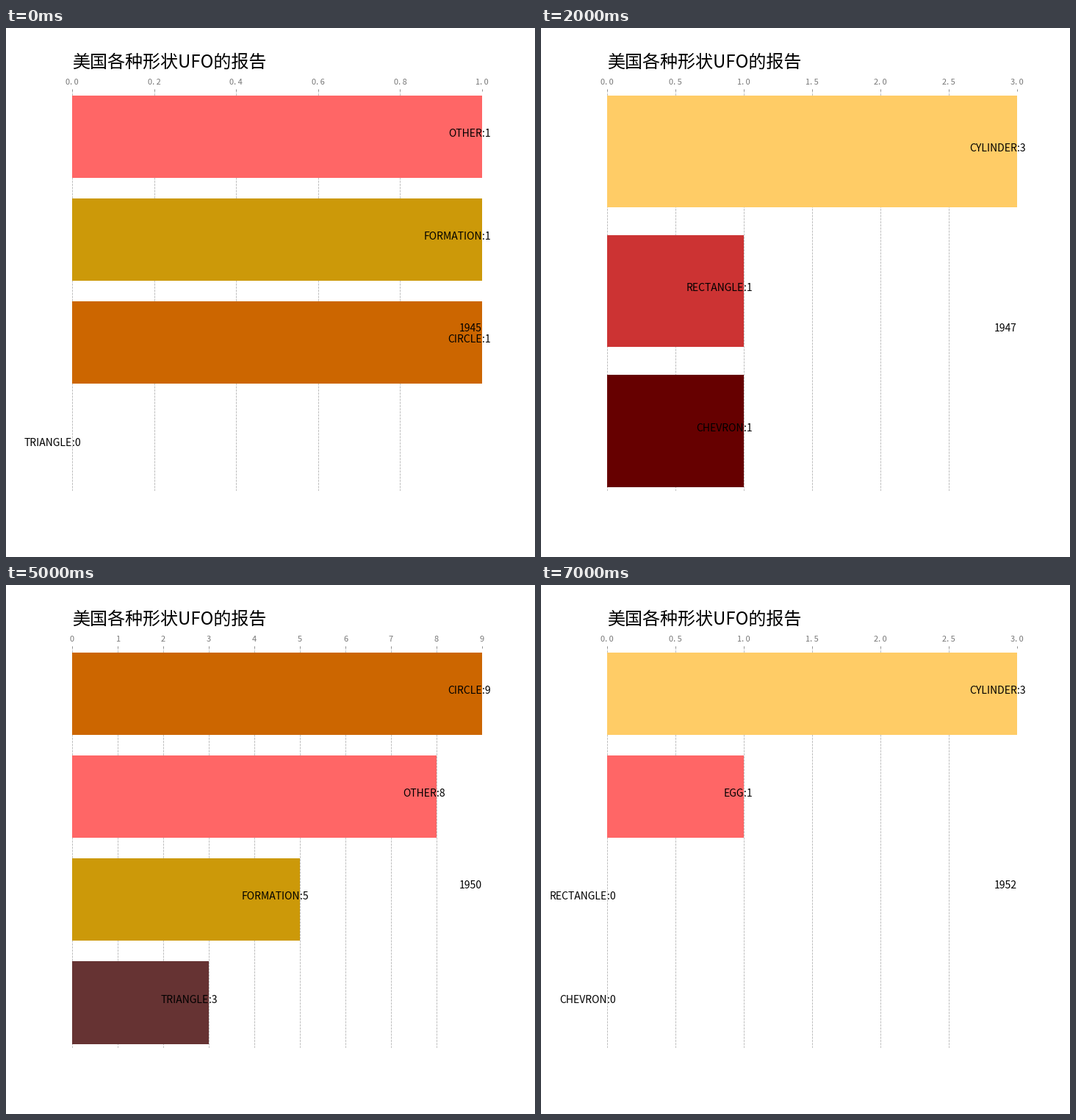
Animation, 720 px wide and 720 px high, one loop 8000 ms. Source, as a matplotlib script:

```python
import matplotlib.pyplot as plt
from matplotlib.animation import FuncAnimation

plt.rcParams["font.family"] = "Noto Sans CJK JP"

TITLE = "美国各种形状UFO的报告"
FIRST_YEAR = 1945
GRAY = "#777777"

COLORS = {
    "OTHER": "#ff6666",
    "FORMATION": "#cc9909",
    "CIRCLE": "#cc6600",
    "TRIANGLE": "#663333",
    "DISK": "#ff9900",
    "CIGAR": "#996633",
    "CYLINDER": "#ffcc66",
    "RECTANGLE": "#cc3333",
    "CHEVRON": "#660000",
    "EGG": "#ff6666",
    "LIGHT": "#ffffcc",
    "SPHERE": "#ffcc33",
    "FIREBALL": "#ffcccc",
}

# One entry per year, bars listed from the bottom up.
REPORTS = [
    {"TRIANGLE": 0, "CIRCLE": 1, "FORMATION": 1, "OTHER": 1},
    {"CIGAR": 1, "DISK": 11},
    {"CHEVRON": 1, "RECTANGLE": 1, "CYLINDER": 3},
    {"LIGHT": 3},
    {"FIREBALL": 2, "SPHERE": 5},
    {"TRIANGLE": 3, "FORMATION": 5, "OTHER": 8, "CIRCLE": 9},
    {"CIGAR": 0, "DISK": 12},
    {"CHEVRON": 0, "RECTANGLE": 0, "EGG": 1, "CYLINDER": 3},
]

fig = plt.figure(figsize=(10, 10), dpi=72, facecolor="white")
ax = fig.add_axes([0.125, 0.125, 0.775, 0.755])


def style_axes(top, count):
    ax.set_frame_on(False)
    ax.set_axisbelow(True)
    ax.set_xlim(0, top)
    margin = 0.01 * (count - 0.2)
    ax.set_ylim(-0.4 - margin, count - 0.6 + margin)
    ax.set_yticks([])
    ax.xaxis.set_ticks_position("top")
    ax.tick_params(axis="x", color=GRAY, labeltop=False, labelbottom=False)
    ax.grid(axis="x", linestyle="--")


def label_ticks(top):
    ticks = [t for t in ax.get_xticks() if -1e-9 <= t <= top + 1e-9]
    whole = all(abs(t - round(t)) < 1e-9 for t in ticks)
    for t in ticks:
        text = f"{t:.0f}" if whole else f"{t:.1f}".replace(".", ". ")
        ax.text(t, 1.0173, text, transform=ax.get_xaxis_transform(),
                size=11, color=GRAY, ha="center")


def draw(i):
    ax.clear()
    names, values = zip(*REPORTS[i].items())
    top = max(values)
    ax.barh(range(len(names)), values, color=[COLORS[n] for n in names])
    style_axes(top, len(names))
    label_ticks(top)
    for y, (name, value) in enumerate(zip(names, values)):
        ax.text(value, y, name, size=14, ha="right")
        ax.text(value, y, f":{value}", size=14, ha="left")
    ax.text(1, 0.4, str(FIRST_YEAR + i), transform=ax.transAxes,
            size=14, ha="right")
    ax.text(0, 1.06, TITLE, transform=ax.transAxes, size=24, ha="left")


anim = FuncAnimation(fig, draw, frames=len(REPORTS), init_func=lambda: None,
                     interval=1000, repeat=True, repeat_delay=0)
plt.show()
```
